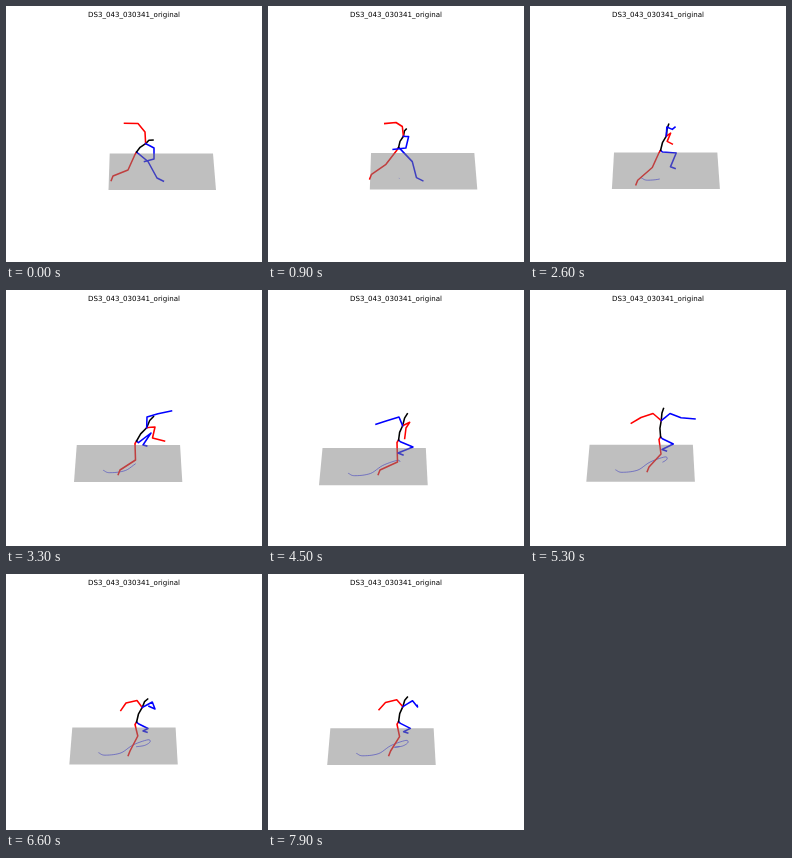
Recreate the animation shown at these times as an HTML page. Size 256x256 px, loop 8000 ms.

```html
<!DOCTYPE html>
<html lang="en">
<head>
<meta charset="utf-8">
<title>Skeleton motion</title>
<style>
html, body { margin: 0; width: 100%; height: 100%; overflow: hidden; background: #fff; }
svg { display: block; width: 100%; height: 100%; }
text { font: 7.08px "DejaVu Sans", sans-serif; text-anchor: middle; text-rendering: geometricPrecision; }
path { fill: none; stroke-width: 1.55; stroke-linejoin: round; stroke-linecap: square; }
#trail { stroke: #00f; stroke-width: .6; stroke-linecap: butt; }
#floor { fill: #808080; fill-opacity: .5; }
</style>
</head>
<body>
<svg viewBox="0 0 256 256">
  <text x="128" y="10.7">DS3_043_030341_original</text>
  <path id="trail"/>
  <g id="body"></g>
  <polygon id="floor"/>
</svg>
<script>
const LOOP = 8000, STEP = 100;
const HIP_X = 130.6;
const GROUND = [131.7, 172.5]; // floor point below the hips

// Distance walked, as seen on screen: time, x, y
const walk = [
  [0, 0, 0], [900, .7, .5], [1800, 6.5, 2.6], [2700, 22.5, .3], [3300, 34.5, -7.6],
  [4000, 49.5, -12.8], [4500, 51.5, -10.6], [5300, 46.2, -7.2], [6300, 38, -5.9], [7200, 43.3, -6.7]
];

// Key poses: time, hip height, head, arms (shoulder, elbow, wrist), legs (knee, ankle)
const pose = (time, hipY, head, redArm, blueArm, redLeg, blueLeg) =>
  [time, hipY, ...head, ...redArm, ...blueArm, ...redLeg, ...blueLeg];

const poses = [
  pose(0, 146, [147, 134], [139, 126, 132, 117.6, 118.5, 117.2], [148, 142, 148, 153, 138.5, 155.5],
    [122, 164, 107, 170], [142, 155.5, 151, 172]),
  pose(1800, 137.5, [129.5, 111], [131, 116.5, 126, 119.5, 120.5, 122.5], [132.3, 117, 128.3, 127, 115.5, 126.5],
    [115, 153.5, 101, 168], [147, 154, 144, 169]),
  pose(3300, 151, [147.5, 126.5], [149, 137, 146.5, 148, 158.5, 151], [141, 127, 152, 123.7, 165.5, 121],
    [129.5, 170, 114, 180], [145, 143, 137, 155]),
  pose(4500, 150, [139.3, 123.7], [141.7, 132.3, 138, 138, 136.7, 148.5], [131, 127, 118, 131, 108, 134.2],
    [129.5, 172, 112, 180], [145, 157, 130, 163]),
  pose(5300, 147, [133.5, 118.5], [123, 123.5, 111, 127.5, 101.3, 133.3], [140, 123.5, 151, 127.8, 165, 129],
    [131, 164, 119, 177], [143.3, 154, 132, 159.5]),
  pose(6600, 148, [141.7, 125], [131, 126.5, 120, 129, 114.8, 136.5], [146.3, 128, 149, 135, 143, 132.3],
    [131.8, 162, 124, 177], [142, 154.5, 137, 157])
];

// The dance ends by opening the arms part of the way again
const [open, closed] = poses.slice(-2);
poses.push([LOOP - STEP, ...closed.map((v, i) => v + .28 * (open[i] - v)).slice(1)]);

// Smooth curve through timed keys, at rest on both ends
function sample(keys, t) {
  let i = 0;
  while (i < keys.length - 2 && t >= keys[i + 1][0]) i++;
  const a = keys[i], b = keys[i + 1], span = b[0] - a[0];
  const u = Math.min(1, (t - a[0]) / span);
  const slope = (k, n) => {
    const p = keys[k - 1], q = keys[k + 1];
    return p && q ? (q[n] - p[n]) / (q[0] - p[0]) * span : 0;
  };
  return a.slice(1).map((v, j) => {
    const n = j + 1, w = b[n], m0 = slope(i, n), m1 = slope(i + 1, n);
    return v + u * (m0 + u * (3 * (w - v) - 2 * m0 - m1 + u * (2 * (v - w) + m0 + m1)));
  });
}

const mix = (p, q, u) => [p[0] + u * (q[0] - p[0]), p[1] + u * (q[1] - p[1])];
const move = (p, x, y) => [p[0] + x, p[1] + y];

// Builds the five limbs; joints close to the trunk follow from their neighbours
function skeleton(t) {
  const [hipY, ...xy] = sample(poses, t);
  const next = count => Array.from({ length: count }, () => xy.splice(0, 2));
  const [head] = next(1), redArm = next(3), blueArm = next(3), redLeg = next(2), blueLeg = next(2);

  const hip = [HIP_X, hipY];
  const chest = mix(mix(redArm[0], blueArm[0], .5), hip, .3);
  const waist = move(mix(hip, chest, .5), -1, -.5);
  const neck = move(mix(chest, head, .5), -.4, -1.6);
  const arm = joints => [chest, mix(chest, joints[0], .5), ...joints];

  const lift = (blueLeg[1][1] - 157) / 15; // the blue foot tilts with its height
  return [
    [hip, move(hip, -1.6, 2.5), ...redLeg, move(redLeg[1], -1.8, 4.6)],
    [hip, move(hip, 1.8, 1.7), ...blueLeg, move(blueLeg[1], 4 + 2.4 * lift, 1.2 + 2 * lift)],
    [hip, waist, chest, neck, head],
    arm(redArm),
    arm(blueArm)
  ];
}

const $ = id => document.getElementById(id);
const line = points => points.length > 1 ? "M" + points.map(p => p.join()).join("L") : "";

const limbs = ["red", "blue", "black", "red", "blue"].map(color => {
  const path = document.createElementNS("http://www.w3.org/2000/svg", "path");
  path.setAttribute("stroke", color);
  return $("body").appendChild(path);
});

function draw(t) {
  const [x, y] = sample(walk, t);

  const left = 102.5 - x, topLeft = left + 1.2 + .045 * x;
  const top = 147.5 - y, bottom = 184 - 1.06 * y;
  $("floor").setAttribute("points", [
    topLeft, top, topLeft + 103.3, top, left + 107.5 + .024 * x, bottom, left, bottom
  ].join(" "));

  const trail = [];
  for (let s = 0; s < t; s += STEP) {
    const [px, py] = sample(walk, s);
    trail.push(move(GROUND, px - x, py - y));
  }
  $("trail").setAttribute("d", line(trail));

  skeleton(t).forEach((joints, i) => limbs[i].setAttribute("d", line(joints)));
}

const begin = performance.now();
function tick() {
  const t = (performance.now() - begin) % LOOP;
  draw(Math.floor(t / STEP) * STEP);
  requestAnimationFrame(tick);
}
tick();
</script>
</body>
</html>
```
